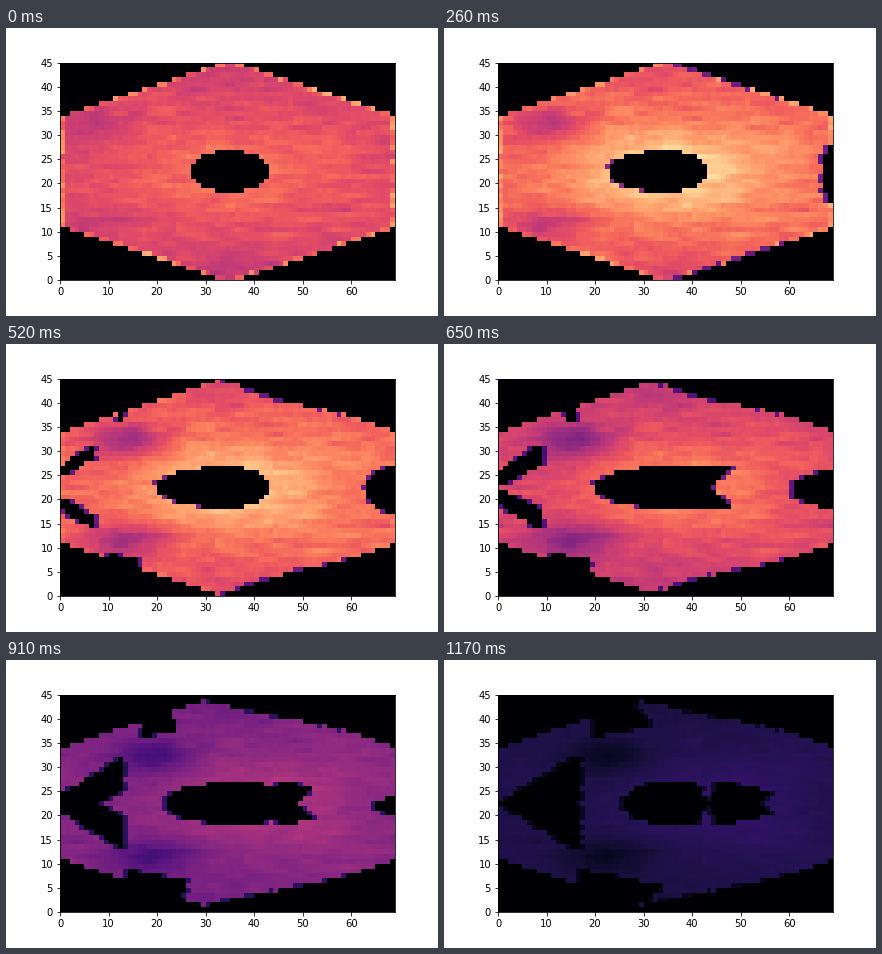
A matplotlib script for the animation above (1.3 s loop, 432 px wide and 288 px high).

```python
import numpy as np
import matplotlib.pyplot as plt
from matplotlib.animation import FuncAnimation

NX, NY, STEPS = 69, 45, 10
MID = 22.5

X, Y = np.meshgrid(np.arange(NX) + .5, np.arange(NY) + .5)
ROW = np.abs(Y - MID)
RIGHT_END = 38 + 3 * (22 - ROW)
HEX = np.abs(X - 35) < RIGHT_END - 35
BULGE = np.sqrt(np.clip(1 - (ROW / 4.4) ** 2, 0, 1))
CORE = np.abs(X - 35) < np.round(8 * BULGE)

rng = np.random.default_rng(7)
grain = rng.normal(size=(NY, NX))
grain = sum(np.roll(grain, k, axis=1) for k in range(4)) / 2
coarse = np.kron(rng.normal(size=(23, 12)), np.ones((2, 6)))[:NY, :NX]
NOISE = .7 * grain + .45 * coarse
CHANCE = np.repeat(rng.random((NY, 35)), 2, axis=1)[:, :NX]


def beside(mask, reach=1):
    """Cells with a marked cell to their left or right."""
    out = np.zeros_like(mask)
    for k in range(1, reach + 1):
        out[:, k:] |= mask[:, :-k]
        out[:, :-k] |= mask[:, k:]
    return out


def bump(dx, dy):
    return np.exp(-dx ** 2 - dy ** 2)


def left_gap(t):
    """Arrow-shaped gap whose inner wedge drifts right."""
    corner = 1.9 * t - .3
    height = 8.2 + .2 * t - .6 * (corner - X)
    return (X < corner) & (X < 4 * (t - 5) + 1.9 * ROW) & (ROW < height)


def notch(t, y, extra):
    """Bite out of the rim with a leaning right wall."""
    left = 6.5 + 1.45 * t - extra
    right = 3.6 * t - 1.5 + extra
    wall = right - 1.2 * np.clip(y - 40, 0, None)
    return (X > left) & (X < wall) & (y > 36 + .2 * (X - left))


def hole(t):
    """Ellipse stretched to the left first, then trailing to the right."""
    reach = 8 + min(2 * t, 7, 2 * (9.5 - t))
    left = (X < 35) & (35 - X < np.round(reach * BULGE))
    waist = max(0, 1.3 * (t - 6)) * bump((X - 43.3) / 1.6, 0)
    height = 4.6 - .2 * np.clip(X - 46, 0, None) - waist
    tail = (X > 37) & (X < 43 + 2.5 * (t - 4.5) + .9 * ROW) & (ROW < height)
    return left | (tail & (t > 4))


def right_gap(t):
    depth = max(0, min(2 * (t - 1), 2 * (9 - t)))
    inside = np.clip((X - 69 + depth) / max(depth, 1), 0, 1)
    return np.abs(Y - 22) < (9 - t) * inside ** .35


def field(t):
    # The right rim retreats row by row until it meets a flatter line
    retreat = np.clip(.7 * (57 - RIGHT_END), 0, max(0, 2 * (t - 2)))
    end = RIGHT_END - np.round(retreat)
    gap = (left_gap(t) | notch(t, Y, 0) | notch(t, NY - Y, 2.7)
           | hole(t) | right_gap(t) | (X > end))
    gap &= HEX & ~CORE

    beat = [0, 2, 4, 6, 9]
    base = np.interp(t, beat, [.605, .68, .665, .495, .13])
    glow = np.interp(t, beat, [.11, .26, .23, .16, .05])
    dip = np.interp(t, beat, [.07, .16, .22, .2, .07])

    # Glow around the hole, forking into two arms behind it
    fork = .3 * np.clip(X - 45, 0, None) * min(1, t / 4)
    val = base + glow * bump((X - 36 - 2 * max(0, t - 4)) / 20, (ROW - fork) / 9)
    dip_x = 7 + 1.75 * t
    val -= dip * (bump((X - dip_x) / 8, (Y - 32.3) / 3.4)
                  + bump((X - dip_x) / 9, (Y - 11.7) / 3.4))
    val -= .1 * base * bump((X - 33) / 12, (ROW - 20) / 5)
    val += .042 * base * np.roll(NOISE, 2 * t, axis=1)

    edge = beside(~HEX, 2) | (X < 1) | (X > 68)
    val += edge * .22 * CHANCE * max(0, 1 - t / 5)

    # Cells draining next to a gap are dark
    front = beside(gap) & (CHANCE < .65)
    if t:
        front |= (X > end - 2) & (X > 33) & (X < 60) & (CHANCE < .75)
    val = np.where(front, val * .45, val)
    return np.where(HEX & ~CORE & ~gap, np.clip(val, 0, 1), 0)


plt.rcParams.update({"font.family": "DejaVu Sans", "font.size": 10})
fig, ax = plt.subplots(figsize=(6, 4), dpi=72)
fig.subplots_adjust(left=.125, right=.9, bottom=.125, top=.88)
mesh = ax.pcolormesh(np.arange(NX + 1), np.arange(NY + 1), field(0),
                     cmap="magma", vmin=0, vmax=1)
ax.set(xlim=(0, NX), ylim=(0, NY), xticks=range(0, 61, 10), yticks=range(0, 46, 5))


def update(step):
    mesh.set_array(field(step))
    return [mesh]


anim = FuncAnimation(fig, update, frames=STEPS, interval=130, repeat=True, repeat_delay=0)
plt.show()
```
